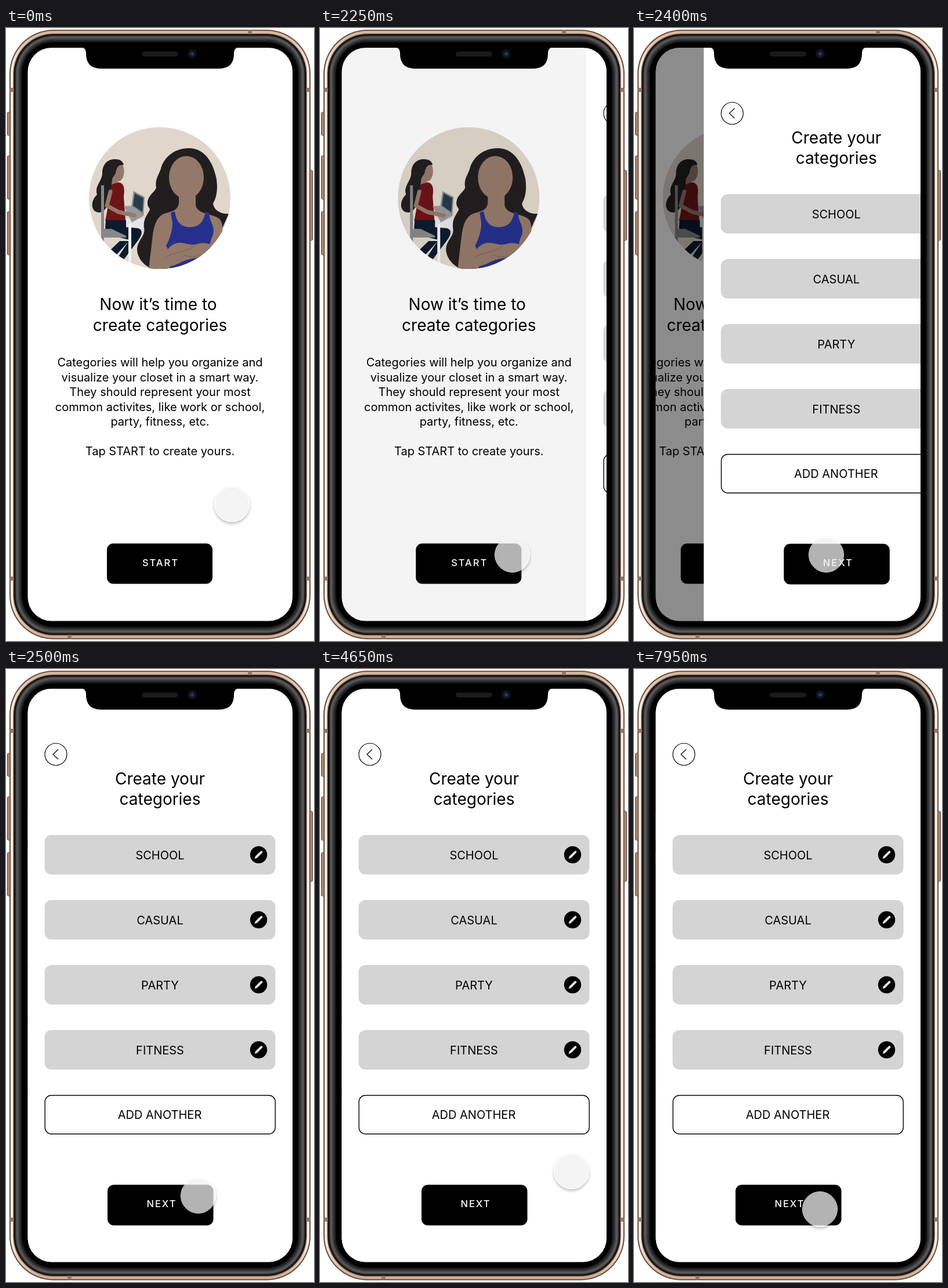
An HTML page for the animation above (8 s loop, 531 px wide and 1056 px high).

```html
<!DOCTYPE html>
<html lang="en">
<head>
<meta charset="utf-8">
<title>Create categories</title>
<style>
  html, body { margin: 0; width: 100%; height: 100%; overflow: hidden; background: #fff; }
  svg { display: block; width: 531px; height: 1056px; }
  text { font: 20px Inter, sans-serif; text-anchor: middle; }
  .title { font-size: 28px; }
  .action { font-size: 16.5px; font-weight: 500; letter-spacing: 2px; fill: #fff; }
  .skin { fill: #94796a; }
  .hair { fill: #221e1f; }
  .line { fill: none; stroke: #000; stroke-width: 1.4; }
  #cursor {
    position: absolute; left: -30.5px; top: -30.5px; width: 61px; height: 61px;
    box-sizing: border-box; border: 1.6px solid #fff; border-radius: 50%;
    background: rgba(240, 240, 240, .745) padding-box;
    box-shadow: 0 3px 5px rgba(0, 0, 0, .25);
  }
</style>
</head>
<body>
<svg viewBox="0 0 531 1056">
  <defs>
    <clipPath id="screen"><rect x="37.500" y="34" width="456.500" height="987.500" rx="41"/></clipPath>
    <clipPath id="portrait"><circle cx="265" cy="293" r="122"/></clipPath>
    <linearGradient id="gold" x2="0" y2="1">
      <stop offset="0" stop-color="#d9b79c"/><stop offset=".06" stop-color="#f8efe7"/>
      <stop offset=".94" stop-color="#f8efe7"/><stop offset="1" stop-color="#cfab92"/>
    </linearGradient>
    <linearGradient id="button">
      <stop offset="0" stop-color="#59402f"/><stop offset=".5" stop-color="#dcb499"/><stop offset="1" stop-color="#59402f"/>
    </linearGradient>
    <radialGradient id="lens">
      <stop offset="0" stop-color="#2c549c"/><stop offset=".5" stop-color="#13254d"/><stop offset="1" stop-color="#101117"/>
    </radialGradient>
    <g id="pencil">
      <circle r="14.7"/>
      <path d="M-7 7L-5.5 2.5 3.5-6.2Q5-7.5 6.3-6.2T6.3-3.4L-2.7 5.5Z" fill="#e4e4e4"/>
    </g>
  </defs>

  <!-- Phone body -->
  <g id="phone">
    <g fill="url(#button)" stroke="#4a352b" stroke-width=".8">
      <rect x="2.500" y="145" width="6" height="40" rx="2"/>
      <rect x="2.500" y="220" width="6" height="75" rx="2"/>
      <rect x="2.500" y="316" width="6" height="75" rx="2"/>
      <rect x="522.500" y="245" width="6" height="121" rx="2"/>
    </g>
  </g>

  <!-- Pages -->
  <g clip-path="url(#screen)">
    <rect x="37" y="34" width="457" height="988" fill="#fff"/>
    <g id="intro">
      <g clip-path="url(#portrait)">
        <rect x="143" y="171" width="244" height="244" fill="#e0d6cc"/>
        <!-- Woman at a desk -->
        <path d="M203 329H243V346H205Z" fill="#e4e5e8"/>
        <path d="M190 226C174 225 166 236 166 250C166 264 152 272 157 287C147 296 145 312 156 317C168 321 176 309 176 296L190 268Z" class="hair"/>
        <ellipse cx="194" cy="247" rx="9.5" ry="17" class="skin"/>
        <path d="M184 250H193V271H182Z" class="skin"/>
        <path d="M176 240C178 223 200 222 203 236C195 235 191 238 189 250L181 263Z" class="hair"/>
        <path d="M183 269L194 266C204 267 205 278 203 290L206 332H171C176 313 177 286 183 269Z" fill="#6d1419"/>
        <path d="M172 331H207V343L228 345C237 348 234 357 229 364L203 399 191 398 213 365 188 359 171 345Z" fill="#0b1b2e"/>
        <path d="M196 367L212 367 180 402 172 390Z" fill="#0b1b2e"/>
        <path d="M164 271H169V346H182L207 358V361H169V395H164Z" fill="#87878a"/>
        <path d="M211 337H216V405H211Z" fill="#f3f3f5"/>
        <path d="M220 281L239 291 237 323 216 308Z" fill="#85888c"/>
        <path d="M222 285L237 293 235 317 219 306Z" fill="#293b48"/>
        <path d="M203 307L217 306 238 323 217 335Z" fill="#98999d"/>
        <path d="M180 282L174 306 194 317 222 323" fill="none" stroke="#94796a" stroke-width="7" stroke-linejoin="round" stroke-linecap="round"/>
        <!-- Woman in front -->
        <path d="M315 207C292 207 273 221 267 242C264 253 256 260 259 275C256 284 243 288 244 304C245 309 248 310 248 313C243 323 236 330 238 345C241 358 226 366 226 382C227 398 239 409 251 415H300L372 347 384 320C371 321 358 314 357 302C364 290 365 275 363 261C357 229 341 207 315 207Z" class="hair"/>
        <path d="M298 280V301C297 314 286 316 275 319C258 324 254 345 252 365L246 416H300L352 390C371 379 377 349 371 333C364 318 328 324 327 304V280Z" class="skin"/>
        <path d="M284 318L291 316C294 336 303 343 317 343C333 343 341 334 344 316L350 318C351 335 361 341 357 356C351 368 352 375 350 383L325 407 300 415H282L286 395 276 375C282 365 287 348 287 336Z" fill="#26308c"/>
        <ellipse cx="311" cy="257.500" rx="30" ry="37" class="skin"/>
        <path d="M274 396C276 380 285 372 297 370C310 369 318 376 330 372C342 369 352 371 358 377L360 387C342 396 320 395 305 402C294 408 284 411 274 412Z" class="skin"/>
        <path d="M276 394C292 386 307 387 324 376M306 391C319 396 339 394 350 386" fill="none" stroke="#6d574b" stroke-width=".8"/>
      </g>
      <text class="title" x="262.500" y="486">Now it’s time to</text>
      <text class="title" x="265.500" y="521.500">create categories</text>
      <g id="body"></g>
      <rect x="174" y="888" width="182" height="69.500" rx="11"/>
      <text class="action" x="266.500" y="927">START</text>
    </g>
    <rect id="dim" x="37" y="34" width="457" height="988"/>
    <g id="categories">
      <rect x="37" y="34" width="457" height="988" fill="#fff"/>
      <circle cx="86" cy="147" r="19" class="line" style="stroke-width:1.2"/>
      <path d="M90 138.500L81 147 90 155.500" class="line" style="stroke-width:1.2"/>
      <text class="title" x="265.500" y="198.500">Create your</text>
      <text class="title" x="265.500" y="234">categories</text>
      <g id="list"></g>
      <rect x="67.200" y="734.500" width="397" height="66.500" rx="11" class="line"/>
      <text x="265" y="775">ADD ANOTHER</text>
      <rect x="175" y="888.500" width="182.500" height="70" rx="11"/>
      <text class="action" x="268.500" y="927">NEXT</text>
    </g>
  </g>

  <!-- Notch -->
  <path d="M129 33Q138 34 138 43V44Q138 70 164 70H367Q393 70 393 44V43Q393 34 402 33Z"/>
  <rect x="234" y="40.500" width="63" height="8.500" rx="4.250" fill="#1b1b1d"/>
  <circle cx="321" cy="44.500" r="8" fill="#101117"/>
  <circle cx="321" cy="44.500" r="5.500" fill="url(#lens)"/>
</svg>
<div id="cursor"></div>
<script>
const $ = id => document.getElementById(id);
const add = (id, markup) => $(id).insertAdjacentHTML('beforeend', markup);

// Nested rounded outlines make up the metal edge: [inset, colour]
const shells = [[0, '#4d382e'], [1.3, '#a98b77'], [2.3, 'url(#gold)'], [6, '#a58774'],
  [7.2, '#2a1d17'], [8.5, '#0e0c0b'], [10, '#3c3c3e'], [12, '#5b5b5d'], [14.5, '#444446'],
  [17, '#29292b'], [20, '#111'], [22, '#000']];
for (const [inset, fill] of shells)
  add('phone', `<rect x="${6 + inset}" y="${3 + inset}" width="${519 - 2 * inset}" height="${1050 - 2 * inset}" rx="${76 - inset}" fill="${fill}"/>`);

const band = (x, y, w, h) => add('phone', `<rect x="${x}" y="${y}" width="${w}" height="${h}" fill="#937566"/>`);
for (const y of [103, 945]) {
  band(6.5, y, 7, 7);
  band(517.5, y, 7, 7);
}
band(417, 3.5, 7, 7);
band(106, 1045.5, 7, 7);

['Categories will help you organize and', 'visualize your closet in a smart way.',
 'They should represent your most', 'common activites, like work or school,',
 'party, fitness, etc.', '', 'Tap START to create yours.'].forEach((line, i) =>
  add('body', `<text x="265.5" y="${583 + i * 25.55}">${line}</text>`));

['SCHOOL', 'CASUAL', 'PARTY', 'FITNESS'].forEach((name, i) => {
  const y = 286 + i * 112;
  add('list', `<rect x="66.500" y="${y}" width="398" height="68" rx="12" fill="#d4d4d4"/>
    <text x="265.5" y="${y + 41.5}">${name}</text>
    <use href="#pencil" x="435.500" y="${y + 34}"/>`);
});

const LOOP = 8000, TICK = 50, SCREEN = 457;
const progress = (t, start, end) => Math.min(1, Math.max(0, (t - start) / (end - start)));
const mix = (a, b, p) => a + (b - a) * p;
const easeOut = (p, power = 3) => 1 - (1 - p) ** power;

// Same curve as CSS ease-in-out: cubic-bezier(.42, 0, .58, 1)
function easeInOut(x) {
  let low = 0, high = 1;
  for (let i = 0; i < 20; i++) {
    const s = (low + high) / 2;
    const at = 3 * (1 - s) ** 2 * s * .42 + 3 * (1 - s) * s * s * .58 + s ** 3;
    if (at < x) low = s; else high = s;
  }
  return low * low * (3 - 2 * low);
}

function cursorAt(t) {
  if (t < 2500) {
    const p = easeInOut(progress(t, 0, 2150));
    return [mix(389, 331, p), mix(820, 907, p)];
  }
  if (t < 7250) {
    const p = progress(t, 2500, 3650);
    return [mix(331, 433, easeOut(p)), mix(907, 865, easeOut(p, 5))];
  }
  const p = easeInOut(progress(t, 7250, 7950));
  return [mix(433, 320, p), mix(865, 930, p)];
}

function render(t) {
  const slide = easeInOut(progress(t, 2193, 2487));
  $('intro').setAttribute('transform', `translate(${-SCREEN / 4 * slide})`);
  $('dim').setAttribute('opacity', .55 * slide);
  $('categories').setAttribute('transform', `translate(${SCREEN * (1 - slide)})`);

  const [x, y] = cursorAt(t);
  $('cursor').style.transform = `translate(${x}px, ${y}px)`;
}

function frame() {
  render(Math.floor(performance.now() % LOOP / TICK) * TICK);
  requestAnimationFrame(frame);
}
frame();
</script>
</body>
</html>
```
